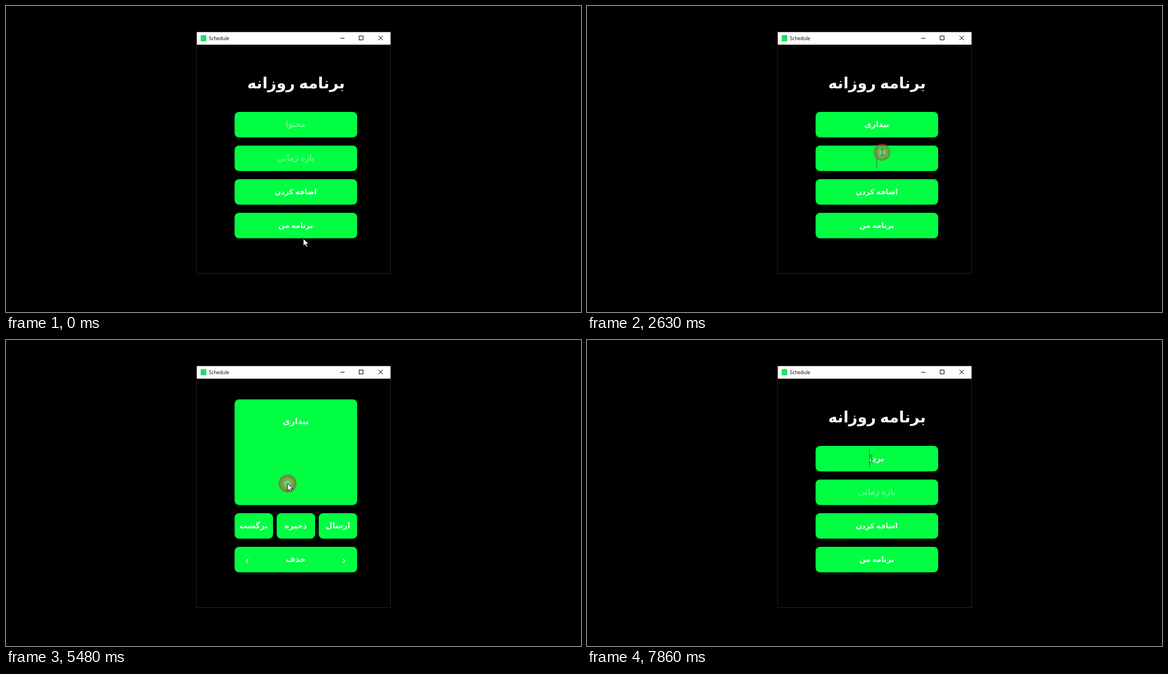
Animation, 1025 px wide and 546 px high, one loop 8 s. Source, as an HTML page with a canvas:

```html
<!DOCTYPE html>
<html lang="fa">
<head>
<meta charset="utf-8">
<title>Schedule</title>
<style>
html, body { margin: 0; width: 100%; height: 100%; overflow: hidden; background: #000; }
canvas { display: block; }
</style>
</head>
<body>
<canvas id="stage" width="1025" height="546"></canvas>
<script>
const ctx = document.getElementById('stage').getContext('2d');
const LOOP = 8000, GREEN = '#00ff43', CX = 516.5;

// When the user presses something
const press = {
  content: 505, range: 2410, add: 4690, open: 5300,
  item: 6115, remove: 6330, back: 6570, again: 7230
};

// Pointer moves: start, end, x, y
const moves = [
  [40, 520, 535, 211], [860, 1000, 550, 213], [2030, 2450, 526, 261],
  [4100, 4270, 538, 298], [4300, 4700, 515, 328], [4920, 5090, 535, 400],
  [5270, 5480, 502, 256], [5560, 6040, 504, 150], [6090, 6170, 500, 224],
  [6170, 6340, 510, 395], [6400, 6570, 441, 335], [6620, 6860, 422, 437],
  [6910, 7250, 521, 208], [7400, 7600, 506, 212]
];

function pointer(t) {
  let x = 530, y = 415;
  for (const [start, end, tx, ty] of moves) {
    if (t < start) break;
    const u = Math.min(1, (t - start) / (end - start));
    const k = u * u * (3 - 2 * u), bow = .15 * Math.sin(Math.PI * k);
    const dx = tx - x, dy = ty - y;
    x += dx * k - dy * bow;
    y += dy * k + dx * bow;
  }
  return [x, y];
}

function typed(word, start, end, t) {
  const step = (end - start) / (word.length - 1);
  return t < start ? '' : word.slice(0, Math.floor((t - start) / step) + 1);
}

// Field values; null shows the hint
function contentValue(t) {
  if (t < press.content) return null;
  if (t < press.back) return typed('بیداری', 900, 1680, t);
  return t < press.again ? null : typed('برن', 7730, 7850, t);
}

function rangeValue(t) {
  return t < press.range || t >= press.back ? null : typed('۶ / ۷', 2890, 3860, t);
}

function box(x, y, w, h) {
  ctx.fillStyle = GREEN;
  ctx.beginPath();
  ctx.roundRect(x + .5, y, w - .5, h - .5, 8);
  ctx.fill();
}

// Centred text with narrow word gaps, words set right to left
function text(str, x, y, size, { weight = 'bold', color = '#fff' } = {}) {
  ctx.font = `${weight} ${size}px "DejaVu Sans", sans-serif`;
  ctx.textAlign = 'left';
  ctx.fillStyle = color;
  const words = str.split(' '), gap = size * .26;
  if (isNumber(str)) words.reverse();
  const widths = words.map(w => ctx.measureText(w).width);
  const total = widths.reduce((a, b) => a + b, gap * (words.length - 1));
  let right = x + total / 2;
  words.forEach((w, i) => {
    ctx.fillText(w, right - widths[i], y);
    right -= widths[i] + gap;
  });
  return total;
}

const isNumber = str => /^[۰-۹]/.test(str);

function line(color, width, ...points) {
  ctx.strokeStyle = color;
  ctx.lineWidth = width;
  ctx.beginPath();
  points.forEach(p => ctx.lineTo(...p));
  ctx.stroke();
}

function frame() {
  ctx.fillStyle = '#000';
  ctx.fillRect(0, 0, 1025, 546);
  line('#1c1c1c', 1, [339.5, 69], [339.5, 477.5]);
  ctx.setLineDash([1, 1]);
  line('#484848', 1, [339.5, 477.5], [685.5, 477.5], [685.5, 69]);
  ctx.setLineDash([]);
  ctx.fillStyle = '#fff';
  ctx.fillRect(340, 46.5, 345.5, 22.5);
  ctx.fillStyle = '#20e060';
  ctx.fillRect(347, 52, 10, 11);
  ctx.font = '8.6px "Open Sans", sans-serif';
  ctx.textAlign = 'left';
  ctx.fillStyle = '#000';
  ctx.fillText('Schedule', 361.5, 61);
  line('#000', 1, [596, 57.5], [603.5, 57.5]);
  ctx.strokeRect(629.5, 53.5, 7, 7);
  line('#000', 1, [664, 53], [672, 61]);
  line('#000', 1, [672, 53], [664, 61]);
}

function field(y, value, hint, focused) {
  box(407, y, 219, 46);
  if (value === null) {
    text(hint, CX, y + 27, 15.5, { weight: 'normal', color: 'rgba(255,255,255,.55)' });
    return;
  }
  const w = value ? text(value, CX, y + 27, 14) : 0;
  if (!focused) return;
  const side = isNumber(value) ? 1 : -1;
  const x = Math.round(CX + side * w / 2 - .5) + .5;
  line('#5c5a4c', 1, [x, y + 6], [x, y + 39]);
}

function button(x, y, w, label, size) {
  box(x, y, w, 46);
  text(label, x + w / 2, y + 27, size);
}

function formScreen(t) {
  const inRange = t >= press.range && t < press.add;
  text('برنامه روزانه', 517, 147, 27.5);
  field(189, contentValue(t), 'محتوا', t < press.range || t >= press.again);
  field(249, rangeValue(t), 'بازه زمانی', inRange);
  button(407, 309, 219, 'اضافه کردن', 13);
  button(407, 369, 219, 'برنامه من', 13);
}

function listScreen(t) {
  box(407, 106, 219, 189);
  if (t < press.remove) {
    if (t >= press.item) {
      ctx.fillStyle = '#00e36a';
      ctx.fillRect(422, 128, 190, 37);
    }
    text('بیداری', CX, 150, 14.5);
  }
  ['برگشت', 'ذخیره', 'ارسال'].forEach((label, i) => button(407 + 75 * i, 309, 69, label, 14));
  button(407, 369, 219, 'حذف', 14.5);
  for (const [x, dir] of [[430, -1], [602.5, 1]])
    line('#fff', 1.6, [x - 1.7 * dir, 390.5], [x + 1.7 * dir, 394], [x - 1.7 * dir, 397.5]);
}

function ripple(t) {
  const start = Object.values(press).find(p => t >= p && t < p + 350);
  if (start === undefined) return;
  const age = t - start;
  const fade = Math.max(0, (age - 200) / 150);
  const r = age < 100 ? 5 + age * .11 : 16 - 7 * fade;
  const [x, y] = pointer(t);
  const g = ctx.createRadialGradient(x, y, 0, x, y, r);
  g.addColorStop(0, 'rgba(190,205,150,.75)');
  g.addColorStop(.5, 'rgba(140,150,85,.75)');
  g.addColorStop(1, 'rgba(165,75,50,.75)');
  ctx.globalAlpha = 1 - fade;
  ctx.fillStyle = g;
  ctx.beginPath();
  ctx.arc(x, y, r, 0, 7);
  ctx.fill();
  ctx.globalAlpha = 1;
}

function cursor(t, form) {
  const [x, y] = pointer(t).map(Math.round);
  const inField = form && x > 407 && x < 626 && (y > 189 && y < 235 || y > 249 && y < 295);
  ctx.save();
  ctx.translate(x, y);
  if (inField) {
    const c = '#7a2f78';
    line(c, 1, [.5, -6], [.5, 6]);
    for (const end of [-5.5, 5.5]) line(c, 1, [-2.5, end], [3.5, end]);
  } else {
    ctx.beginPath();
    [[0, 0], [0, 13], [3, 10.3], [5.2, 15], [7.4, 14], [5.3, 9.5], [9.3, 9.3]]
      .forEach(p => ctx.lineTo(...p));
    ctx.closePath();
    ctx.fillStyle = '#fff';
    ctx.fill();
    ctx.strokeStyle = '#000';
    ctx.lineWidth = .9;
    ctx.stroke();
  }
  ctx.restore();
}

function draw(now) {
  const t = now % LOOP;
  const form = t < press.open || t >= press.back;
  frame();
  if (form) formScreen(t);
  else listScreen(t);
  ripple(t);
  cursor(t, form);
  requestAnimationFrame(draw);
}
requestAnimationFrame(draw);
</script>
</body>
</html>
```
